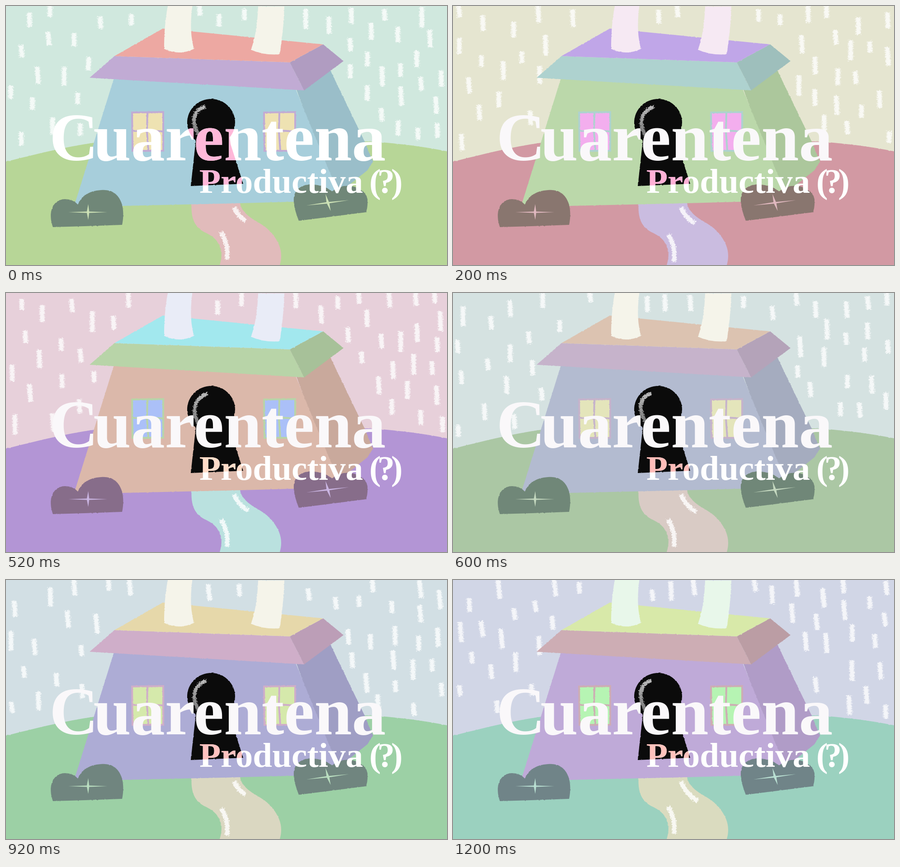
These frames come from a looping animation (976x574 px, 1400 ms). An HTML page:

```html
<!DOCTYPE html>
<html lang="es">
<head>
<meta charset="utf-8">
<title>Cuarentena Productiva (?)</title>
<style>
html, body { margin: 0; width: 100%; height: 100%; overflow: hidden; }
svg { display: block; width: 100%; height: 100%; background: var(--sky); }
text { font-family: "Liberation Serif", "Times New Roman", serif; font-weight: bold; }
.hill { fill: var(--hill); }
.roof { fill: var(--roof); }
.eave { fill: var(--eave); }
.eave-shade { fill: color-mix(in srgb, var(--eave) 91%, #000); }
.front { fill: var(--front); }
.front-shade { fill: color-mix(in srgb, var(--front) 92%, #000); }
.pane { fill: var(--pane); stroke: var(--eave); stroke-width: 4; }
.chimney { fill: var(--chimney); }
.path { fill: var(--path); }
.bush { fill: var(--bush); }
.spark { fill: color-mix(in srgb, var(--hill) 70%, #fff); }
.tint { fill: var(--tint); }
.brush { fill: none; stroke: #fff; stroke-linejoin: round; }
</style>
</head>
<body>
<svg viewBox="0 0 976 574" preserveAspectRatio="none">
  <defs>
    <filter id="rough" filterUnits="userSpaceOnUse" x="-20" y="-20" width="1016" height="614" color-interpolation-filters="sRGB">
      <feTurbulence type="fractalNoise" baseFrequency=".22" numOctaves="2" seed="4"/>
      <feDisplacementMap in="SourceGraphic" scale="2.5" xChannelSelector="R" yChannelSelector="G"/>
    </filter>
    <filter id="hairy" filterUnits="userSpaceOnUse" x="-20" y="-20" width="1016" height="614" color-interpolation-filters="sRGB">
      <feTurbulence type="fractalNoise" baseFrequency=".3 .45" numOctaves="2" seed="9"/>
      <feDisplacementMap in="SourceGraphic" scale="9" xChannelSelector="R" yChannelSelector="G"/>
    </filter>
    <linearGradient id="shine" x1="0" y1="0" x2="0" y2="1">
      <stop offset="0" stop-color="#ccc"/>
      <stop offset="1" stop-color="#888"/>
    </linearGradient>
    <path id="hole" d="M420 298A53 52 0 1 1 495 291L497 306 525 394 409 399Z"/>
    <path id="star" d="M-44 0L-3-1.5 0-18 2-1.5 42 0 2 1.5 0 17-3 1.5Z"/>
    <g id="window">
      <path class="pane" d="M0 0L69-1 69 85 1 85Z"/>
      <path class="pane" d="M34 0L33 42 36 85M0 41L34 40 69 42"/>
    </g>
    <clipPath id="inHole"><use href="#hole"/></clipPath>
    <text id="title" font-size="150" x="96" y="342">C<tspan dx="-11">uarentena</tspan></text>
    <text id="sub" font-size="77" y="414"><tspan x="428">Productiva</tspan> <tspan x="804" letter-spacing="-8">(?)</tspan></text>
  </defs>

  <g class="brush" filter="url(#hairy)">
    <path id="rainSoft" stroke-width="12" opacity=".4"/>
    <path id="rainCore" stroke-width="8.5" opacity=".6"/>
  </g>

  <g filter="url(#rough)">
    <path class="hill" d="M-15 348L0 345C60 330 130 312 196 303L800 300C860 303 920 311 976 322L995 326V594H-15Z"/>
    <path class="path" d="M411 434C407 480 425 495 445 504C476 520 482 545 473 574L470 590H604L606 574C614 546 606 522 582 497C562 476 524 470 517 434Z"/>
    <path class="front-shade" d="M641 180L718 143 795 303 812 345 800 364 745 408 730 425Z"/>
    <path class="front" d="M239 160L153 436 160 443 258 443 520 437 742 431 641 184Z"/>
    <path class="eave" d="M240 111L628 125 660 187 185 159Z"/>
    <path class="eave-shade" d="M628 125L702 85 747 122 660 187Z"/>
    <path class="roof" d="M347 50L702 85 628 125 240 111Z"/>
    <path class="chimney" d="M360-12C352 30 350 60 350 95Q383 111 416 95C407 60 408 30 414-12Z"/>
    <path class="chimney" d="M558 1H616C615 40 610 80 606 107Q572 110 542 97Q556 60 558 1Z"/>
    <use href="#window" x="279" y="236"/>
    <use href="#window" x="571" y="236"/>
    <path class="bush" d="M104 490C94 466 98 430 130 428Q148 428 159 440Q172 410 210 408C250 404 266 440 257 485Q180 488 104 490Z"/>
    <path class="bush" d="M648 476C640 455 636 440 637 425C640 398 668 392 690 397Q710 401 722 411Q738 396 765 399Q795 406 800 428Q801 445 797 457Q720 467 648 476Z"/>
    <use href="#hole" fill="#0b0b0b"/>
  </g>
  <use class="spark" href="#star" transform="translate(182 457)"/>
  <use class="spark" href="#star" transform="translate(713 436) rotate(-7) skewX(10) scale(1.1)"/>

  <g class="brush" filter="url(#hairy)">
    <path id="glint" stroke="url(#shine)" stroke-width="8" opacity=".9"/>
    <path id="gloss" stroke-width="10" opacity=".8"/>
  </g>

  <use id="titleFill" href="#title"/>
  <use href="#sub" fill="#fff"/>
  <g class="tint" clip-path="url(#inHole)">
    <use id="titleTint" href="#title"/>
    <use href="#sub"/>
  </g>
</svg>
<script>
const STEP = 200;
const KEYS = 'sky hill roof eave front pane chimney path bush tint'.split(' ');
const PALETTES = [
  'd0e8de b7d697 eda8a2 c1abd4 a7cedb eee2b2 f5f4ea e1bbbb 708778 ffb8d9',
  'e5e5d0 d299a3 c0a6e8 aed2cf bbd8aa f3aeee f6e9f3 cabce0 89766f ffb0d6',
  'e7d0da b395d5 a2e8ee b8d4a8 dbb8aa abc0f8 e9ecf7 bae1df 876d8a ffdcc8',
  'd5e2e1 abc7a4 dcc3b1 c6b3cb b3bbd0 e4e5bb f5f4ea d9cbc5 708778 ffbcb8',
  'd2dfe4 9cd0a5 e6d8aa cfaec9 adacd5 d5e9ab f5f4ea dad7c1 70857f ffc1bf',
  'e6d1e3 9a99d1 a5e8ce cdceab d8abb4 aee2f3 e9f2f5 bbdfcf 796f87 f8deb0',
  'd1d6e6 9bd1bf d8e9a9 cdadb4 bfaad8 b6f4b3 e8f7ea dadbbf 708488 ffc2bc'
].map(row => row.split(' '));

// Where rain may fall: left of the house, between the chimneys, right of the house
const OPEN_SKY = new Path2D(
  'M0-9H337L222 111 168 159 220 165 180 292 0 330Z M428-9H538V50H428Z ' +
  'M636-9H976V312L812 290 738 145 763 122 713 77 643 60Z');
const ctx = document.createElement('canvas').getContext('2d');
const inSky = (x, y) => ctx.isPointInPath(OPEN_SKY, x, y);
const $ = id => document.getElementById(id);

function random(seed) {
  return () => (seed = (seed * 16807) % 2147483647) / 2147483647;
}

// Scatter drops that keep their distance from one another
function rain(rnd) {
  const lean = rnd() * 5, drops = [];
  for (let i = 0; i < 1500; i++) {
    const x = 10 + rnd() * 956, y = 8 + rnd() * 300, len = 24 + rnd() * 22;
    const gap = x < 400 ? 46 : 39;
    const free = drops.every(d => Math.hypot(d.x - x, (d.y - y) / 1.35) > gap);
    if (free && inSky(x, y - len / 2) && inSky(x, y + len / 2)) drops.push({ x, y, len });
  }
  return drops.map(({ x, y, len }) => {
    const dx = lean + rnd() * 4 - 2;
    return `M${x - dx / 2} ${y - len / 2}l${dx} ${len}`;
  }).join('');
}

// Two wet strokes on the path, redrawn a little differently each time
function gloss(rnd) {
  const reach = rnd(), y = 501 + rnd() * 8;
  return `M505 446q8 ${20 + reach * 10} ${25 + reach * 18} ${29 + reach * 22}` +
    `M476 ${y}Q493 530 489 ${y + 60}`;
}

function glint(rnd) {
  const x = 439 + rnd() * 9, end = 280 + rnd() * 10;
  return `M${x} 223C${x - 26} 231 408 ${end - 32} 426 ${end}`;
}

const SCENES = PALETTES.map((colors, n) => {
  const rnd = random(7919 * (n + 3));
  return { colors, rain: rain(rnd), gloss: gloss(rnd), glint: glint(rnd) };
});
const start = performance.now();
let shown = -1;

function show(n) {
  const scene = SCENES[n];
  KEYS.forEach((key, i) => document.documentElement.style.setProperty('--' + key, '#' + scene.colors[i]));
  $('rainSoft').setAttribute('d', scene.rain);
  $('rainCore').setAttribute('d', scene.rain);
  $('gloss').setAttribute('d', scene.gloss);
  $('glint').setAttribute('d', scene.glint);
  $('titleFill').setAttribute('fill', n ? '#faf8fa' : '#fff');
  $('titleTint').setAttribute('visibility', n ? 'hidden' : 'visible');
}

function tick() {
  const n = Math.floor((performance.now() - start) / STEP) % SCENES.length;
  if (n !== shown) show(shown = n);
  requestAnimationFrame(tick);
}
tick();
</script>
</body>
</html>
```
